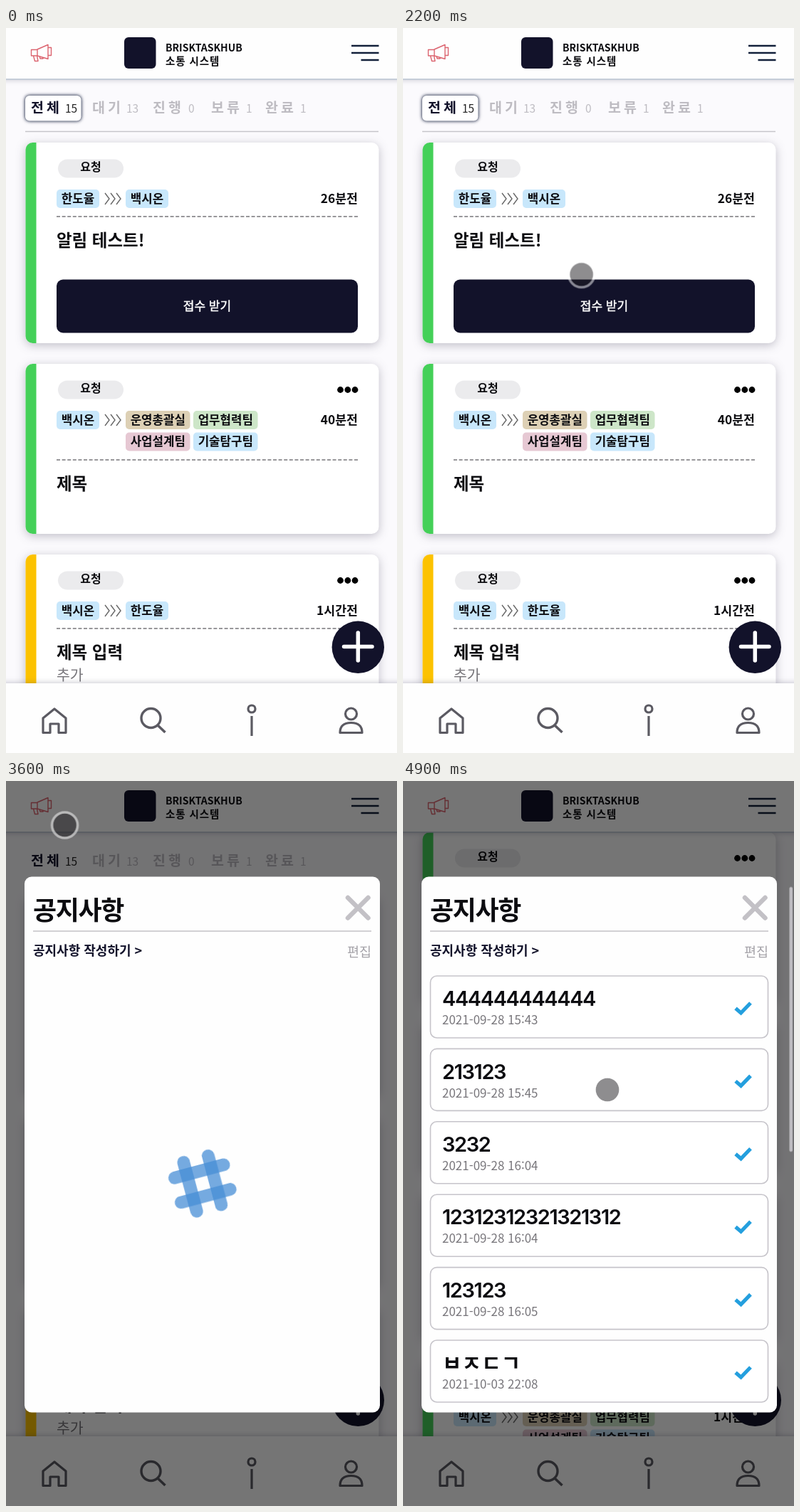
Write an HTML page that moves like this. It is 549 px wide and 1019 px high and loops after 5000 ms.

```html
<!DOCTYPE html>
<html lang="ko">
<head>
<meta charset="utf-8">
<title>소통 시스템</title>
<style>
  html, body { margin: 0; width: 100%; height: 100%; overflow: hidden; background: #fbfafd; }
  body { position: relative; }
  svg { position: absolute; left: 0; top: 0; }
  text { font-family: "Noto Sans CJK KR", "Noto Sans CJK", "Noto Sans", sans-serif; white-space: pre; }
  .number { font-family: Inter, sans-serif; letter-spacing: -1.4px; }
  .medium { stroke: currentColor; stroke-width: .45px; }
  .card { filter: drop-shadow(0 3px 7px rgba(40, 35, 60, .28)); }
  .bar { filter: drop-shadow(0 0 4px rgba(60, 60, 90, .35)); }
  .active { filter: drop-shadow(0 0 2px rgba(20, 30, 60, .9)) drop-shadow(0 0 2px rgba(20, 30, 60, .4)); }
  #spinner { position: absolute; left: 276px; top: 566px; font-size: 35.5px; transform: rotate(165deg); }
  #spinner i { position: absolute; width: .5em; height: .5em; border-radius: .25em; transform: translate(-50%, -50%); }
</style>
</head>
<body>
<svg id="stage" width="549" height="1019" viewBox="0 0 549 1019"></svg>
<div id="spinner"><i id="across"></i><i id="upright"></i></div>
<script>
const LOOP = 5000, STEP = 100;
const NAVY = '#12122a', SKY = '#c8e7fb', TAN = '#ddd0b5', MINT = '#cde6c8', PINK = '#e6c8d3';
const GREEN = '#44d058', YELLOW = '#fcc200';
const ANN = '한도율', BEN = '백시온';
const TEAMS = [['운영총괄실', TAN], ['업무협력팀', MINT], ['사업설계팀', PINK], ['기술탐구팀', SKY]];

// Text is placed by its visual middle.
const text = (x, y, size, str, { weight = 700, fill = '#0c0c10', anchor = 'start', gap = 0, cls = '' } = {}) =>
  `<text x="${x}" y="${y + size * .37}" font-size="${size}" font-weight="${weight}" fill="${fill}" color="${fill}"
    text-anchor="${anchor}"${gap ? ` letter-spacing="${gap}"` : ''} class="${cls}">${str}</text>`;
const rect = (x, y, w, h, r, fill, extra = '') =>
  `<rect x="${x}" y="${y}" width="${w}" height="${h}" rx="${r}" fill="${fill}" ${extra}/>`;
const line = (d, stroke, width, extra = '') =>
  `<path d="${d}" fill="none" stroke="${stroke}" stroke-width="${width}" ${extra}/>`;
const ring = (x, y, r, stroke, width) =>
  `<circle cx="${x}" cy="${y}" r="${r}" fill="none" stroke="${stroke}" stroke-width="${width}"/>`;

const chip = (x, y, str, fill) => {
  const w = str.length > 3 ? 90.5 : 60;
  return rect(x, y, w, 26, 5, fill) + text(x + w / 2, y + 12.5, 16.8, str, { anchor: 'middle', weight: 600 });
};

function card({ y, h, color, from, to, ago, title, note, button }) {
  const toTeams = Array.isArray(to);
  const rule = y + (toTeams ? 135 : 104);
  const chips = toTeams
    ? to.map(([name, fill], i) => chip(168 + i % 2 * 95, y + 66 + (i >> 1) * 30.5, name, fill)).join('')
    : chip(168, y + 66, to, SKY);
  const arrows = [139, 147, 155].map(x => `M${x} ${y + 71}l6 8l-6 8`).join('');
  const dots = [469.5, 479.8, 490].map(x => `<circle cx="${x}" cy="${y + 36.5}" r="4.4"/>`).join('');
  return `<g class="card">${rect(27.5, y, 496, h, 10, '#fff')}
      <path d="M42.5 ${y}h-5a10 10 0 0 0 -10 10v${h - 20}a10 10 0 0 0 10 10h5z" fill="${color}"/></g>`
    + rect(73, y + 23.5, 92, 26, 13, '#ebebed') + text(119, y + 34.5, 16, '요청', { anchor: 'middle' })
    + chip(71, y + 66, from, SKY) + line(arrows, '#666', 1.4) + chips
    + text(494, y + 79, 17.3, ago, { anchor: 'end', weight: 600 })
    + line(`M71 ${rule}H494`, '#77757a', 1.6, 'stroke-dasharray="5 2.6"')
    + text(71, rule + 33, 23.5, title)
    + (note ? text(71, rule + 65, 20.5, note, { weight: 300, fill: '#77757a' }) : '')
    + (button
      ? rect(71, y + 192.5, 423, 75, 9, NAVY)
        + text(282.5, y + 230, 17, button, { anchor: 'middle', weight: 400, fill: '#fff', cls: 'medium' })
      : dots);
}

const tabs = [[35, '전체', 83, 15], [121, '대기', 169, 13], [206, '진행', 256, 0], [288, '보류', 337, 1], [364, '완료', 413, 1]]
  .map(([x, name, nx, n], i) =>
    text(x, 112, 19.5, name, { gap: 4, fill: i ? '#bebcc2' : NAVY })
    + text(nx, 113, 15.5, n, { weight: 400, fill: i ? '#bebcc2' : '#222' })).join('');

const cards = [
  { y: 161, h: 282, color: GREEN, from: ANN, to: BEN, ago: '26분전', title: '알림 테스트!', button: '접수 받기' },
  { y: 472, h: 239, color: GREEN, from: BEN, to: TEAMS, ago: '40분전', title: '제목' },
  { y: 740, h: 210, color: YELLOW, from: BEN, to: ANN, ago: '1시간전', title: '제목 입력', note: '추가' },
  { y: 979, h: 207, color: GREEN, from: BEN, to: ANN, ago: '1시간전', title: '제목' },
  { y: 1215, h: 239, color: GREEN, from: BEN, to: TEAMS, ago: '1시간전', title: '제목' }
].map(card).join('');

const header = rect(-10, -10, 569, 82, 0, '#fefefe', 'class="bar"') + line('M0 72H549', '#b9c3d0', 1.3)
  + line('M44 30L59 23.5V43.5L44 39ZM35.5 30.5H44V39H35.5ZM38.5 39L40.5 46.5H45L43.5 39M59 27.5H63.5V38.5H59M47 40l1 3h4l-.5-2',
    '#dc6570', 1.4, 'stroke-linejoin="round"')
  + rect(166, 13, 44.5, 44, 6, NAVY)
  + text(224, 28, 14, 'BRISKTASKHUB', { weight: 600 })
  + text(224, 47, 14.5, '소통 시스템', { weight: 600, gap: .9 })
  + line('M485 25H523.5M485 35H523.5M498.5 45H523.5', '#12203a', 2.3);

const nav = rect(-10, 921, 569, 110, 0, '#fefefe', 'class="bar"')
  + line('M52 970L68 957L84 970V990.5H74V978H62V990.5H52Z', '#5b5a62', 3.2, 'stroke-linejoin="round"')
  + ring(203.5, 970, 13.5, '#5b5a62', 3.4) + line('M213 980L223.5 990', '#5b5a62', 3.6)
  + ring(345, 957, 5, '#5b5a62', 3.2) + line('M345 967V995', '#5b5a62', 3.2)
  + ring(484.5, 964, 8, '#5b5a62', 3.2)
  + line('M469 990.5C469 981 474 976.5 484.5 976.5S500 981 500 990.5Z', '#5b5a62', 3.2, 'stroke-linejoin="round"');

const fab = `<circle cx="494.3" cy="870.3" r="36.7" fill="${NAVY}"/>`
  + line('M474.500 869.500H514M494.300 850V889', '#fff', 5.5, 'stroke-linecap="round"');

const notices = [['444444444444', '09-28 15:43'], ['213123', '09-28 15:45'], ['3232', '09-28 16:04'],
  ['12312312321321312', '09-28 16:04'], ['123123', '09-28 16:05'], ['ㅂㅈㄷㄱ', '10-03 22:08']]
  .map(([title, date], i) => {
    const y = 274 + i * 102.4;
    const digits = /^\d/.test(title);
    return rect(38.5, y, 474, 87, 9, '#fff', 'stroke="#c6c4ca" stroke-width="1.6"')
      + text(55, y + 31.5, digits ? 29 : 30, title, { weight: digits ? 600 : 700, cls: digits ? 'number' : '' })
      + text(55, y + 62, 17, '2021-' + date, { weight: 400, fill: '#77757a' })
      + line(`M467 ${y + 45.5}L474.5 ${y + 52}L488 ${y + 38}`, '#249fde', 5.2);
  }).join('');

const modal = rect(26, 134.5, 499, 753, 10, '#fefefe')
  + text(38, 182, 36, '공지사항', { gap: -1.4 })
  + line('M480 164L508.500 192.500M508.500 164L480 192.500', '#c3c1c6', 6.5, 'stroke-linecap="round"')
  + line('M38 211H513', '#c3c1c6', 1.6)
  + text(38, 238.5, 18, '공지사항 작성하기 &gt;', { fill: NAVY })
  + text(513, 240, 18.5, '편집', { anchor: 'end', weight: 400, fill: '#a5a3a9' })
  + `<g id="list">${notices}</g>`;

const arm = 'M-1.500 -1.500V-7H-5L0 -12.500L5 -7H1.500V-1.500Z';
const arms = [0, 90, 180, 270].map(a => `<path d="${arm}" transform="rotate(${a})"/>`).join('');
const mover = `<g transform="translate(315 444)"><g fill="#fff" stroke="#fff" stroke-width="2">${arms}</g>${arms}
  <rect x="-1.600" y="-1.600" width="3.200" height="3.200"/></g>`;

document.getElementById('stage').innerHTML = rect(0, 0, 549, 1019, 0, '#fbfafd')
  + `<g id="page"><g id="active">${rect(27, 95, 78.5, 35.5, 6, '#fff', 'class="active"')}</g>${tabs}`
  + line('M27 145.500H523', '#c6c5ca', 1.5) + cards + '</g>'
  + fab + header + nav
  + `<g id="overlay">${rect(0, 0, 549, 1019, 0, '#000', 'opacity=".54"')}${modal}</g>`
  + `<g id="tap">${rect(27, 13, 45, 44, 3, '#4189ab')}</g>`
  + `<g id="scrollbar">${rect(542.5, 4.5, 4.5, 372, 2, '#bebcc0')}</g>`
  + `<g id="mover">${mover}</g>`
  + `<g id="pointer"><g id="dot"><circle r="16.500" fill="rgba(30,28,32,.5)"/>
      <circle r="18" fill="none" stroke="#fff" stroke-opacity=".5" stroke-width="3.500"/></g></g>`;

const animations = [];
function track(id, props, steps) {
  const frames = steps.map(([ms, values, easing = 'linear']) => {
    const frame = { offset: ms / LOOP, easing };
    props.forEach((p, i) => frame[p] = [].concat(values)[i]);
    return frame;
  });
  const animation = document.getElementById(id).animate(frames, { duration: LOOP, iterations: Infinity });
  animation.pause();
  animations.push(animation);
}
const show = (id, from, to = LOOP) => track(id, ['opacity'],
  [[0, 0, 'step-end'], [from, 1, 'step-end'], [to, 0, 'step-end'], ...(to < LOOP ? [[LOOP, 0]] : [])]);
const path = (id, steps) => track(id, ['transform'],
  steps.map(([ms, x, y, easing]) => [ms, `translate(${x}px, ${y}px)`, easing]));

show('mover', 1300, 1900);
show('pointer', 2000);
show('overlay', 3000);
show('tap', 3000, 3200);
show('spinner', 3000, 4000);
show('list', 4000);
show('scrollbar', 4500);
track('active', ['opacity'], [[0, 1, 'step-end'], [3000, 0, 'step-end'], [LOOP, 0]]);

path('dot', [[0, 315, 444], [2000, 315, 444, 'ease-in-out'], [2600, 40, 27], [3200, 40, 27, 'ease-in'],
  [3600, 82, 61, 'ease-out'], [4200, 274, 425], [4600, 274, 425], [4900, 287, 434], [LOOP, 287, 434]]);
path('page', [[0, 0, 0], [4600, 0, 0, 'ease-in-out'], [4900, 0, -400], [LOOP, 0, -400]]);
path('scrollbar', [[0, 0, 0], [4600, 0, 0, 'ease-in-out'], [4900, 0, 144.5], [LOOP, 0, 144.5]]);

// Two mirrored bars per direction, drawn as shadows that stretch and slide.
const pair = (x, y) => [[x, y], [-x, -y]].map(([a, b]) => `${a}em ${b}em rgba(71,142,214,.75)`).join(',');
const spin = (id, side, place) => track(id, [side, 'boxShadow'], [
  [0, ['.5em', place(1)]],
  [2945, ['.5em', place(1)], 'ease'],
  [3645, ['2.5em', place(0)], 'ease'],
  [4345, ['.5em', place(-1)], 'ease'],
  [4945, ['.5em', place(1)]],
  [LOOP, ['.5em', place(1)]]
]);
spin('across', 'width', k => pair(k, -.5));
spin('upright', 'height', k => pair(.5, k));

const start = performance.now();
function draw() {
  const elapsed = (performance.now() - start) % LOOP;
  // The extra millisecond keeps hard changes clear of rounding at their own offset.
  const time = Math.floor(elapsed / STEP) * STEP + 1;
  animations.forEach(a => a.currentTime = time);
  requestAnimationFrame(draw);
}
draw();
</script>
</body>
</html>
```
